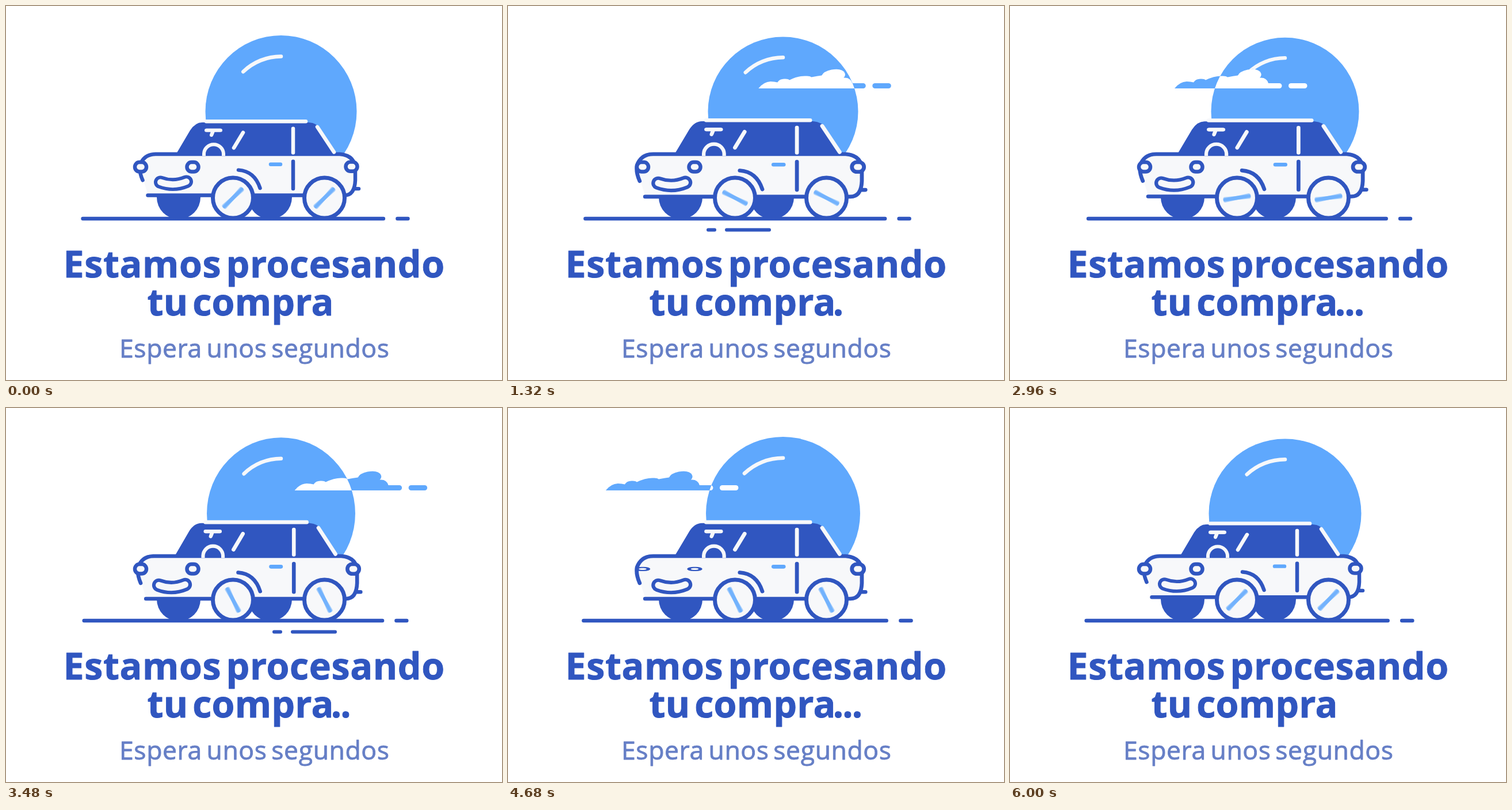
An HTML page that plays this animation: 862 by 649 pixels, repeating every 6.04 s.

```html
<!DOCTYPE html>
<html lang="es">
<head>
<meta charset="utf-8">
<style>
  html, body { margin: 0; width: 100%; height: 100%; overflow: hidden; background: #fff; }
  svg { display: block; width: 862px; height: 649px; font-family: "Open Sans", "Noto Sans", sans-serif; }
  .line { fill: none; stroke: #3056c0; stroke-width: 6.5; stroke-linecap: round; stroke-linejoin: round; }
  .pale { stroke: #f7f8fa; }
  .sky { stroke: #5fa8fd; }
  .dark { fill: #3056c0; }
  .body { fill: #f7f8fa; }
  text { stroke-width: .9; stroke-linejoin: round; letter-spacing: .6px; }
  .title { fill: #3056c0; stroke: #3056c0; font-weight: 700; font-size: 64.5px; word-spacing: -9px; }
  .note { fill: #667fc6; stroke: #667fc6; font-size: 44.5px; word-spacing: -4.5px; }
</style>
</head>
<body>
<svg viewBox="0 0 862 649">
  <defs>
    <clipPath id="sunClip"><circle class="sun" cx="0" cy="0" r="132"/></clipPath>
    <clipPath id="edge"><rect x="8" width="845" height="649"/></clipPath>
    <g id="cloudShape">
      <path d="M-115 16.5Q-106 5 -94 4.500Q-87 4.500 -82 6Q-78 -1 -68 0Q-63 0 -61 2Q-45 -6 -31 -5Q-25 -5 -23 -3Q-13 -5 -5 -6Q-2 -13 12 -16Q31 -19 35 -10Q37 -6 33 -2Q45 -3 48 7.500H67A4.500 4.500 0 0 1 67 16.500Z"/>
      <rect x="83" y="7.500" width="32.500" height="9" rx="4.500"/>
    </g>
    <rect id="lamp" class="line" x="-10" y="-8.200" width="20" height="16.400" rx="8" style="fill:#f7f8fa"/>
    <g id="wheel">
      <circle class="line" r="35" style="fill:#f7f8fa;stroke-width:7"/>
      <g class="spoke">
        <path class="line sky" d="M-21 0H21" opacity=".45" transform="rotate(-4)"/>
        <path class="line sky" d="M-21 0H21" opacity=".45" transform="rotate(4)"/>
        <path class="line sky" d="M-21 0H21" opacity=".6"/>
      </g>
    </g>
  </defs>

  <g class="sun">
    <circle r="132" fill="#5fa8fd"/>
    <path class="line pale" d="M-66 -69A95.500 95.500 0 0 1 0 -95.500"/>
  </g>
  <g clip-path="url(#edge)">
    <use class="cloud" href="#cloudShape" fill="#5fa8fd"/>
    <g clip-path="url(#sunClip)"><use class="cloud" href="#cloudShape" fill="#fff"/></g>
  </g>

  <path id="ground" class="line" d="M134 369H655.500M680 369H698"/>
  <path id="dashes" class="line" d="M-53 0H-42M-21 0H53" style="stroke-width:6"/>
  <circle class="dark" cx="300" cy="332" r="38"/>
  <circle class="dark" cx="459" cy="332" r="38"/>

  <g id="car">
    <path class="body" d="M258 257H580Q607 260 607 285V305Q607 329 588 329H247L232 282Q236 258 258 257Z"/>
    <path class="line" d="M237.500 303Q231 288 233 276Q240 257 260 257H580Q607 259 607 285V303Q606 329.500 588 329.600H246.500M606 318H613"/>
    <path class="dark" d="M295 258L320 215Q329 201 341 201H526Q541 202 546 213L573 258Z"/>
    <path class="line pale" d="M348 199.300H521M541 209L570 253.500M499 212V254.500M396 246L412 219"/>
    <path class="dark" d="M343 260V258A18 18 0 0 1 379 258V260Z"/>
    <path class="line pale" d="M348 215H373M360 216L357 223.500M344 260V257A17 17 0 0 1 378 257V260" style="stroke-width:6;stroke-linecap:butt"/>
    <path class="line pale" d="M348 215H373M360 216L357 223.500" style="stroke-width:6"/>
    <path class="line" d="M499 270V318M404 285Q432 287 441.500 317"/>
    <path class="line sky" d="M460 275H477"/>
    <path class="line" d="M268.500 306.500Q291 315 313.500 305.500" style="stroke-width:23"/>
    <path class="line pale" d="M268.500 306.500Q291 315 313.500 305.500" style="stroke-width:11"/>
    <use href="#lamp" x="600.500" y="279"/>
  </g>
  <use class="eye" href="#lamp"/>
  <use class="eye" href="#lamp"/>
  <use href="#wheel" x="394.500" y="333"/>
  <use href="#wheel" x="553.500" y="333"/>

  <text class="title" x="99.500" y="471">Estamos procesando</text>
  <text class="title" x="245.500" y="537" style="letter-spacing:.2px">tu compra<tspan id="dots" dx="-5" style="letter-spacing:-1.9px"></tspan></text>
  <text class="note" x="197" y="610">Espera unos segundos</text>
</svg>
<script>
const LOOP = 6040, FRAME = 40;
const $ = id => document.getElementById(id);
const all = (sel, value) => document.querySelectorAll(sel).forEach((el, i) =>
  el.setAttribute('transform', typeof value === 'function' ? value(i) : value));
const clamp = v => Math.max(0, Math.min(1, v));
const wave = turns => Math.cos(turns * 2 * Math.PI);

// Smooth path through [time, value] points
function along(keys, t) {
  const i = Math.max(1, keys.findIndex(k => k[0] >= t));
  const [t0, a] = keys[i - 1], [t1, b] = keys[i];
  return a + (b - a) * (1 - wave((t - t0) / (t1 - t0) / 2)) / 2;
}

const sunTop = [[0, 51], [300, 50], [700, 53.5], [1000, 51], [1320, 53.5], [1700, 50], [2160, 51.7],
  [2500, 54], [2960, 54.7], [3220, 49], [3600, 52], [4040, 49.5], [4300, 48], [4680, 50],
  [5200, 50.5], [5600, 53], [6040, 53.5]];
const sunRadius = [[0, 131.5], [1320, 130.5], [2160, 133], [2960, 128.5], [4040, 129.5], [4680, 134], [6040, 132.5]];

function draw(t) {
  const rx = along(sunRadius, t), ry = 183 - along(sunTop, t);
  all('.sun', `translate(478 183) scale(${rx / 132} ${ry / 132})`);
  $('ground').setAttribute('transform', `translate(417 0) scale(${1 + (rx - 131) * .003} 1) translate(-417 0)`);

  const c = t % 2000;
  const size = clamp(Math.min(c / 450, (2000 - c) / 195));
  all('.cloud', `translate(${3 + c * .4146} 126.5) scale(${size})`);

  const d = t % 1000;
  const grow = clamp(Math.min(d / 77, (600 - d) / 80));
  $('dashes').setAttribute('transform', `translate(${165 + d * .7375} 388.5) scale(${grow})`);
  $('dots').textContent = '.'.repeat((d >= 100) + (d >= 400) + (d >= 640));

  // The body stretches along and across at different rates
  const sx = 1 + .045 * clamp(1.6 * Math.abs(Math.sin(Math.PI * t / 250)));
  const sy = 1 + .02 * wave(25 * t / LOOP - .39);
  $('car').setAttribute('transform', `translate(430 258) scale(${sx} ${sy}) translate(-430 -258)`);

  const blink = clamp((140 - Math.abs(t % 2500 - 2170)) / 80);
  all('.eye', i => `translate(${[234, 324.5][i]} 279.3) scale(1 ${1 - .68 * blink})`);
  all('.spoke', `rotate(${-45 - t * .9})`);
}

function tick() {
  draw(Math.floor(performance.now() % LOOP / FRAME) * FRAME);
  requestAnimationFrame(tick);
}
tick();
</script>
</body>
</html>
```
